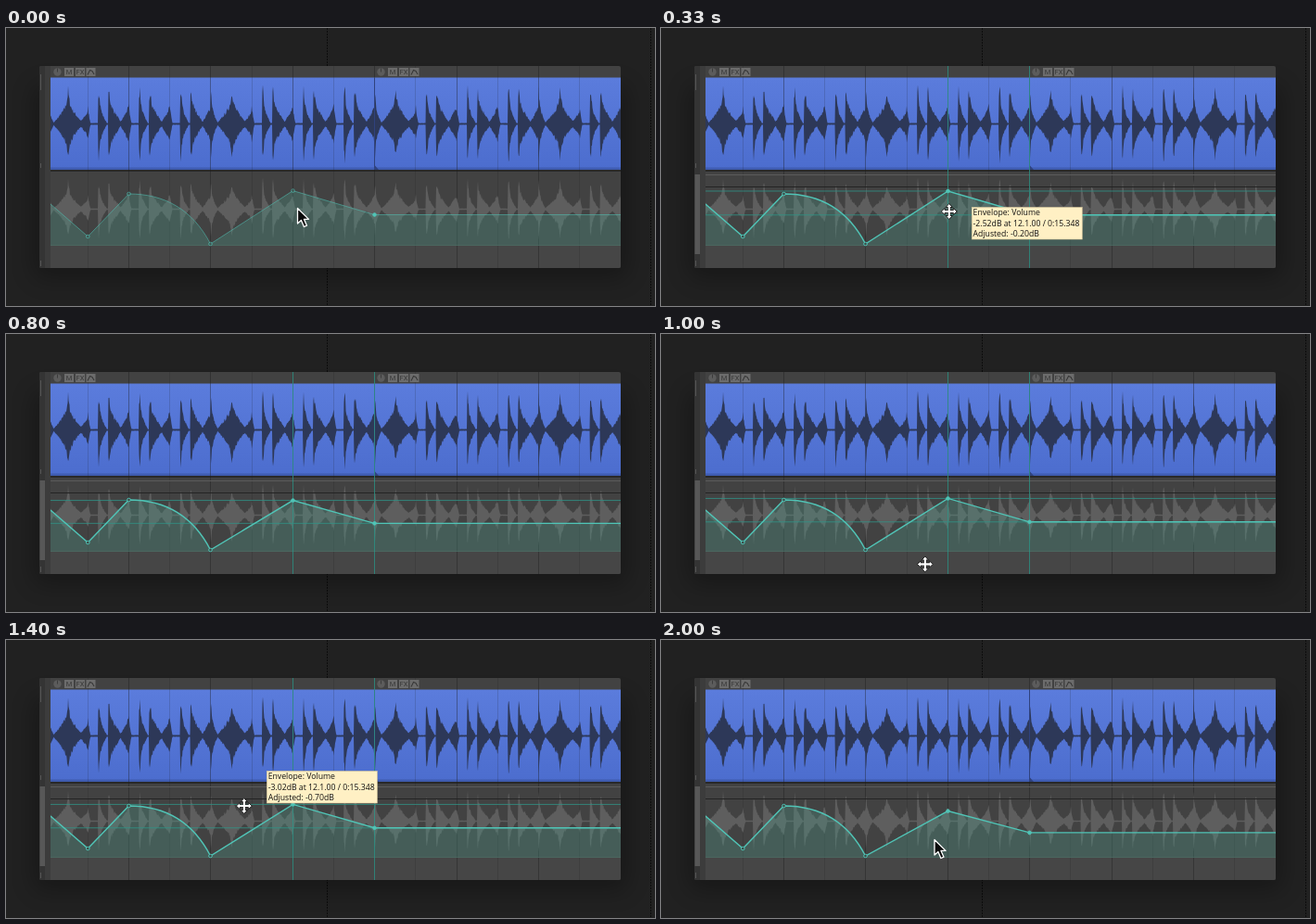
Animation of 700x300 px, one loop 2.07 s. Source, as an HTML page:

```html
<!DOCTYPE html>
<html lang="en">
<head>
<meta charset="utf-8">
<title>Volume envelope</title>
<style>
html, body { margin: 0; width: 100%; height: 100%; overflow: hidden; background: #212121; }
svg { display: block; width: 700px; height: 300px; }
.tip text { font: 500 8.7px "Open Sans", "Noto Sans", sans-serif; fill: #111; }
.icon text { font: 7.5px Roboto, sans-serif; fill: #383838; text-anchor: middle; }
</style>
</head>
<body>
<svg viewBox="0 0 700 300" xmlns="http://www.w3.org/2000/svg">
  <defs>
    <linearGradient id="blue" x2="0" y2="1">
      <stop offset="0" stop-color="#5b7cdc"/><stop offset="1" stop-color="#4c6dce"/>
    </linearGradient>
    <filter id="blur" x="-20%" y="-30%" width="140%" height="160%"><feGaussianBlur stdDeviation="12"/></filter>
    <clipPath id="panel"><rect x="36" y="41" width="627" height="218" rx="2"/></clipPath>
    <clipPath id="track"><rect x="48" y="41" width="615" height="218"/></clipPath>
    <g id="icons" class="icon">
      <circle cx="55.5" cy="47.5" r="4.2" fill="#5c5c5c"/>
      <path d="M55.5 47.5V43.5" stroke="#3c3c3c"/>
      <path d="M63 43h10v9h-10zM75 43h10v9h-10zM86.5 43h10v9h-10z" fill="#6c6c6c"/>
      <text x="68" y="50.3">M</text><text x="80" y="50.3">FX</text>
      <path d="M88 50.5L90.500 45.500 93 46.500 95 50" fill="none" stroke="#383838" stroke-width="1.1"/>
    </g>
  </defs>

  <rect width="700" height="300" fill="#212121"/>
  <path d="M346.5 0V300M695.5 0V300" stroke="#0c0c0c" stroke-dasharray="2 1"/>
  <rect x="30" y="62" width="640" height="208" rx="8" opacity=".28" filter="url(#blur)"/>

  <g clip-path="url(#panel)">
    <rect x="36" y="41" width="627" height="218" fill="#424242"/>
    <rect x="36" y="41" width="6" height="218" fill="#343434"/>
    <rect x="42" y="41" width="6" height="218" fill="#3c3c3c"/>
    <path d="M37.5 50V67M37.5 146V151M37.5 251V257" stroke="#555"/>
    <rect id="bar" x="36.5" y="158" width="5.5" height="86" fill="#575757"/>
    <g clip-path="url(#track)">
      <rect x="48" y="235" width="615" height="24" fill="#464646"/>
      <rect x="48" y="53.5" width="615" height="99.500" fill="url(#blue)"/>
      <rect x="48" y="150.5" width="615" height="2.5" fill="#3f5cb0"/>
      <rect x="48" y="153" width="615" height="2" fill="#292929"/>
      <g id="grid" stroke="#1c1c1c"></g>
      <path id="waveTop" fill="#2d3858"/>
      <path id="waveLow" fill="#5e5e5e"/>
      <path d="M397.5 54V153" stroke="#2f427e"/>
      <path d="M398 148.5L402 153H398Z" fill="#2f427e"/>
      <use href="#icons"/><use href="#icons" x="349"/>
      <g id="lane">
        <path d="M48 158.5H663" stroke="#5b5b5b"/>
        <path d="M48 171.5H663" stroke="#232323"/>
      </g>
      <path d="M48 234.5H663" stroke="#507068" opacity=".6"/>
      <path id="fill" fill="#4c9687" opacity=".32"/>
      <g id="guides" stroke="#2f9588" opacity=".8">
        <path d="M309.5 41V259M397.5 41V259"/><path id="levels"/>
      </g>
      <path id="line" fill="none" stroke="#50c4b6"/>
      <g id="dots" stroke="#50c4b6"></g>
    </g>
    <g id="tip" class="tip">
      <rect x=".5" y=".5" width="119" height="34.5" fill="#fff0c4" stroke="#d5c79c" stroke-width=".6"/>
      <text x="1.8" y="9.3">Envelope: Volume</text>
      <text x="1.8" y="20.7" id="value"></text>
      <text x="1.8" y="32" id="change"></text>
    </g>
    <g id="move" fill="#fff" stroke="#111" stroke-width=".9" stroke-linejoin="round"></g>
    <path id="arrow" fill="#0a0a0a" stroke="#fff" stroke-width="1.3" stroke-linejoin="round"
      d="M0 0V16.5L3.9 13 6.9 20 10 18.7 7 11.9H12Z"/>
  </g>
</svg>
<script>
const $ = id => document.getElementById(id);
const set = (id, attrs) => Object.entries(attrs).forEach(([name, v]) => $(id).setAttribute(name, v));
const show = (id, on) => set(id, { visibility: on ? "visible" : "hidden" });
const place = (id, x, y) => set(id, { transform: `translate(${x} ${y})` });
const clamp = v => Math.max(0, Math.min(1, v));
const BEAT = 44.2, LEFT = 48, RIGHT = 663;

// Drum loop of four beats: a sharp attack with a fading body, and swells
const hit = (d, peak, body, len) =>
  d < -1 || d > len ? 0 : peak * Math.exp(-Math.abs(d) / 1.2) + body * (1 - Math.max(0, d) / len);

function loudness(x) {
  const p = x - 44, beat = Math.floor(p / BEAT) % 4, q = p % BEAT;
  const swell = 19 * clamp((q - 33) / 11) ** 1.3;
  if (beat === 0) {
    const d = Math.abs(q - 23);
    const bloom = 22 * clamp(1 - d / 17) ** 1.1 + 17 * Math.exp(-d / 1.5);
    return Math.max(1, hit(q, 28, 18, 8), bloom, swell * 0.7);
  }
  return Math.max(1, hit(q, 10, 12, 3), hit(q - 12, 24, 18, 9), hit(q - 23, 16, 23, 14), swell);
}

function wave(mid, scale) {
  let seed = 7;
  const rnd = () => (seed = seed * 16807 % 2147483647) / 2147483647;
  const edge = side => {
    const pts = [];
    for (let x = LEFT; x <= RIGHT; x += 0.5) {
      pts.push(x + " " + (mid + side * scale * loudness(x) * (0.78 + 0.3 * rnd())).toFixed(1));
    }
    return pts;
  };
  return "M" + edge(-1).join("L") + "L" + edge(1).reverse().join("L") + "Z";
}
set("waveTop", { d: wave(103.5, 1) });
set("waveLow", { d: wave(195.5, 0.8) });

for (let i = 1; i < 14; i++) {
  const x = Math.floor(44.1 + i * BEAT) + 0.5;
  $("grid").innerHTML += `<path d="M${x} 41V259" opacity="${i % 2 ? 0.16 : 0.38}"/>`;
}

for (let turn = 0; turn < 360; turn += 90) {
  $("move").innerHTML += `<path transform="rotate(${turn})" d="M-1.3 0V-4.5H-3.6L0 -8.5 3.6 -4.5H1.3V0"/>`;
}
$("move").innerHTML += `<path d="M-4.5 0H4.5M0 -4.5V4.5" stroke="#fff" stroke-width="2"/>`;

// Motion over steps of one fifteenth of a second
function drop(k) {
  const dip = 4.1 * Math.exp(-((k - 11.3) ** 2) / 17);
  const e = clamp((k - 19) / 7);
  return dip + 9 * e * e * (3 - 2 * e);
}
const mouseX = k => 314 - 42 * (k / 18) ** 2;
const mouseY = k => k < 11
  ? 196 + 2 * Math.max(0, k - 4) ** 3
  : 144 + 11.7 * Math.abs(k - 20) ** 1.36 * (k > 20 ? 3 : 1);

function draw(t) {
  const r = t % 200;
  const k = 3 * Math.floor(t / 200) + (r >= 130 ? 2 : r >= 70 ? 1 : 0);
  const active = k > 0, drag = active && k < 28;
  const o = drop(k), peak = 175.6 + o, flat = 201.5 + o * 0.71;

  const curve = `M48 190L88.3 225L132.5 179C170 179 201 195 220.5 233L309.5 ${peak}L397.5 ${flat}H663`;
  set("line", { d: curve, "stroke-width": active ? 1.4 : 0.9, opacity: active ? 1 : 0.6 });
  set("fill", { d: curve + "V234.5H48Z" });
  set("levels", { d: `M48 ${peak}H663M48 ${flat}H663` });
  $("dots").innerHTML = [[88.3, 225], [132.5, 179], [220.5, 233], [309.5, peak], [397.5, flat]].map(([x, y], i) => {
    const full = i === 4 || (i === 3 && active);
    return `<circle cx="${x}" cy="${y}" r="1.8" fill="${full ? "#50c4b6" : "#3d4745"}" opacity="${active || full ? 1 : 0.65}"/>`;
  }).join("");

  for (const id of ["bar", "lane"]) show(id, active);
  for (const id of ["guides", "move", "tip"]) show(id, drag);
  show("arrow", !drag);
  if (drag) {
    const db = Math.round(o * 4) / 10;
    place("move", mouseX(k), mouseY(k));
    // The label trails the pointer by one step
    place("tip", mouseX(k) + 24, mouseY(k - 1) - 3);
    $("value").textContent = `-${(2.32 + db).toFixed(2)}dB at 12.1.00 / 0:15.348`;
    $("change").textContent = `Adjusted: -${db.toFixed(2)}dB`;
  } else if (active) {
    place("arrow", 295, 215.5 + 1.25 * Math.max(0, 30 - k));
  } else {
    place("arrow", 314.5, 194.5);
  }
}

function tick() {
  draw(performance.now() % 2070);
  requestAnimationFrame(tick);
}
tick();
</script>
</body>
</html>
```
